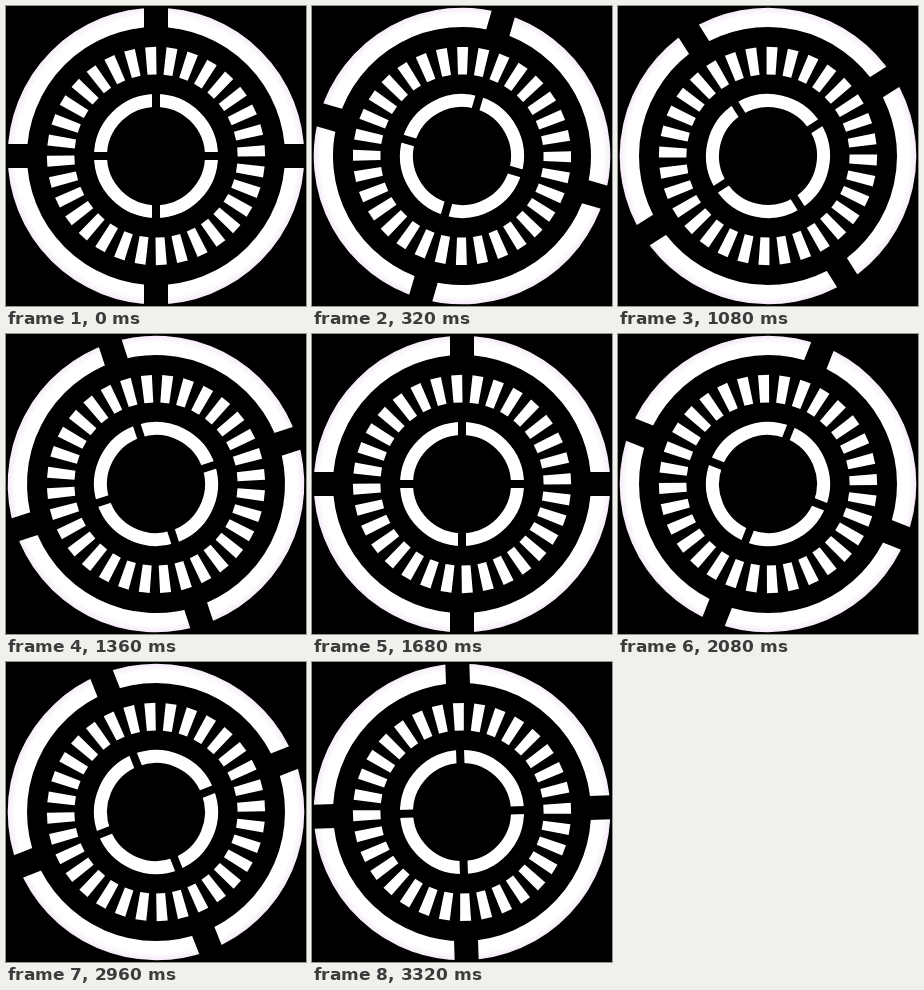
An HTML page that plays this animation: 300x300 px, repeating every 3360 ms.

```html
<!DOCTYPE html>
<html lang="en">
<head>
<meta charset="utf-8">
<title>Rotating rings</title>
<style>
  html, body { margin: 0; width: 100%; height: 100%; overflow: hidden; background: #000; }
  svg { display: block; width: 100%; height: 100%; }
  circle { fill: none; stroke: #fff; }
  .gap { stroke: #000; }
  #teeth { fill: #fff; }
</style>
</head>
<body>
<svg viewBox="-150 -150 300 300">
  <defs>
    <radialGradient id="sheen" gradientUnits="userSpaceOnUse" cx="0" cy="0" r="148.3">
      <stop offset="0.95" stop-color="#fff"/>
      <stop offset="1" stop-color="#f5ebf7"/>
    </radialGradient>
  </defs>
  <g id="outer">
    <circle r="138.65" stroke-width="19.3" style="stroke: url(#sheen)"/>
    <path class="gap" d="M-150 0H150M0-150V150" stroke-width="24"/>
  </g>
  <g id="teeth"></g>
  <g id="inner">
    <circle r="55.5" stroke-width="13"/>
    <path class="gap" d="M-64 0H64M0-64V64" stroke-width="8"/>
  </g>
</svg>
<script>
  const LOOP = 3360, STEP = 40;
  // The motion has 100 poses at 30 per second, shown on a 40 ms grid.
  const POSES = 100, RATE = 30;
  const TEETH = 32;
  // Degrees turned per loop; each ring's symmetry closes the loop.
  const turns = { outer: 180, teeth: -90, inner: 180 };
  const rings = Object.entries(turns).map(([id, turn]) => [document.getElementById(id), turn]);

  function addTooth(index) {
    const tooth = document.createElementNS("http://www.w3.org/2000/svg", "path");
    tooth.setAttribute("d", "M-5.5 -109H5.5L4.5 -81.5H-4.5Z");
    tooth.setAttribute("transform", `rotate(${(index - 0.25) * 360 / TEETH})`);
    document.getElementById("teeth").append(tooth);
  }
  for (let i = 0; i < TEETH; i++) addTooth(i);

  const start = performance.now();

  function draw() {
    const elapsed = (performance.now() - start) % LOOP;
    const shown = Math.floor(elapsed / STEP) * STEP;
    const pose = Math.floor(shown * RATE / 1000);
    for (const [ring, turn] of rings) {
      ring.setAttribute("transform", `rotate(${turn * pose / POSES})`);
    }
    requestAnimationFrame(draw);
  }
  draw();
</script>
</body>
</html>
```
